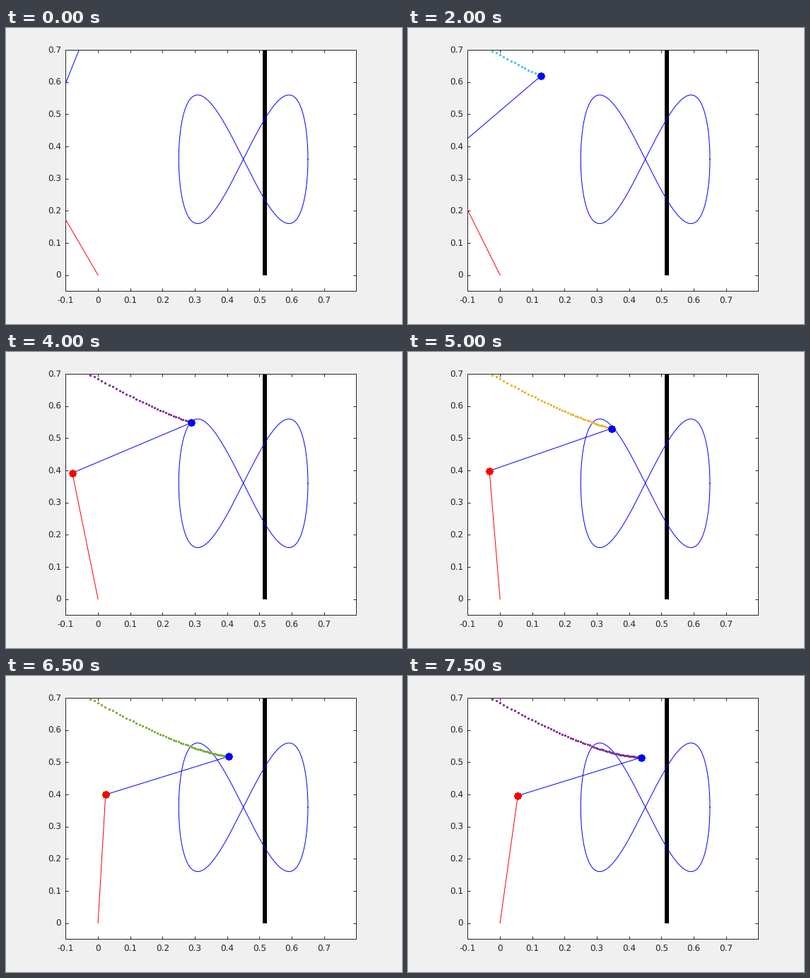
Write a matplotlib script that moves like this. It is 560x420 px and loops after 8 s.

```python
import numpy as np
import matplotlib.pyplot as plt
from matplotlib.animation import FuncAnimation

DPI = 80
PX = 72 / DPI            # one pixel in points
FRAMES, STEP_MS = 16, 500
LINK = 0.4               # length of both arm links
DOTS_PER_FRAME = 5
FIRST_DOT = 1.25         # when the hand enters the view, in frames
START = (-0.052, 0.717)
INK = "#262626"
CYCLE = ["#0072BD", "#D95319", "#EDB120", "#7E2F8E",
         "#77AC30", "#4DBEEE", "#A2142F"]

plt.rcParams["font.family"] = "DejaVu Sans"
plt.rcParams["text.hinting"] = "none"

# Axes box in pixels, measured from the top left of the stage
LEFT, RIGHT, TOP, BOTTOM = 84.47, 495.45, 31.1, 373.4
XLIM, YLIM = (-0.1, 0.8), (-0.05, 0.7)
SCALE = (BOTTOM - TOP) / (YLIM[1] - YLIM[0])

# Time in frames, then the hand position in pixels
KEYS = np.array([
    (FIRST_DOT, 119.5, 33.0), (2, 138.5, 42.6), (4, 187.5, 68.5),
    (6, 229.5, 87.5), (8, 261.5, 100.3), (11, 297.5, 110.7),
    (13, 315.5, 114.5), (15, 329.5, 115.5)])
key_t, key_px, key_py = KEYS.T
PATH_X = np.polyfit(key_t, XLIM[0] + (key_px - LEFT) / SCALE, 4)
PATH_Y = np.polyfit(key_t, YLIM[0] + (BOTTOM - key_py) / SCALE, 4)


def hand_at(t):
    return np.polyval(PATH_X, t), np.polyval(PATH_Y, t)


def elbow_for(x, y):
    bend = np.arccos(np.hypot(x, y) / (2 * LINK))
    angle = np.arctan2(y, x) + bend
    return LINK * np.cos(angle), LINK * np.sin(angle)


fig = plt.figure(figsize=(560 / DPI, 420 / DPI), dpi=DPI, facecolor="#F0F0F0")
ax = fig.add_axes([LEFT / 560, 1 - BOTTOM / 420,
                   (RIGHT - LEFT) / 560, (BOTTOM - TOP) / 420])
ax.set(xlim=XLIM, ylim=YLIM)

xticks = np.arange(-1, 8) / 10
yticks = np.arange(0, 8) / 10
ax.set_xticks(xticks, [f"{v:g}" for v in xticks])
ax.set_yticks(yticks, [f"{v:g}" for v in yticks])
ax.tick_params(direction="in", top=True, right=True, length=4.2 * PX,
               width=PX, color=INK, labelcolor=INK, labelsize=12 * PX)
ax.tick_params(axis="x", pad=8.3 * PX)
ax.tick_params(axis="y", pad=6.5 * PX)
for spine in ax.spines.values():
    spine.set(linewidth=PX, color=INK)

# Wall and figure-eight
ax.plot([0.516, 0.516], [0, 0.7], color="black", lw=6 * PX,
        solid_capstyle="butt", zorder=2)
s = np.linspace(0, 2 * np.pi, 400)
ax.plot(0.45 + 0.2 * np.cos(s), 0.36 + 0.2 * np.sin(2 * s),
        color="blue", lw=PX, zorder=3)


def link(color):
    return ax.plot([], [], color=color, lw=PX, zorder=4)[0]


def points(color, marker, size, edge, zorder):
    return ax.scatter([], [], s=(size * PX) ** 2, marker=marker, color=color,
                      linewidths=edge * PX, clip_on=False, zorder=zorder)


upper, fore = link("red"), link("blue")
trail = points(CYCLE[0], "o", 3.3, 0, 5)
elbow_dot = points("red", (8, 2, 0), 8, 3, 6)
hand_dot = points("blue", (8, 2, 0), 8, 3, 6)


def show_points(dots, x, y):
    """Show only the points whose centre lies inside the axes."""
    xy = np.column_stack([x, y])
    low, high = np.transpose([XLIM, YLIM])
    dots.set_offsets(xy[np.all((xy >= low) & (xy <= high), axis=1)])


def update(n):
    hx, hy = hand_at(n) if n else START
    ex, ey = elbow_for(hx, hy)
    upper.set_data([0, ex], [0, ey])
    fore.set_data([ex, hx], [ey, hy])
    show_points(elbow_dot, ex, ey)
    show_points(hand_dot, hx, hy)
    show_points(trail, *hand_at(np.arange(FIRST_DOT, n, 1 / DOTS_PER_FRAME)))
    trail.set_color(CYCLE[3 * n % len(CYCLE)])
    return upper, fore, trail, elbow_dot, hand_dot


anim = FuncAnimation(fig, update, frames=FRAMES, interval=STEP_MS,
                     repeat=True, repeat_delay=0, blit=False)
plt.show()
```
